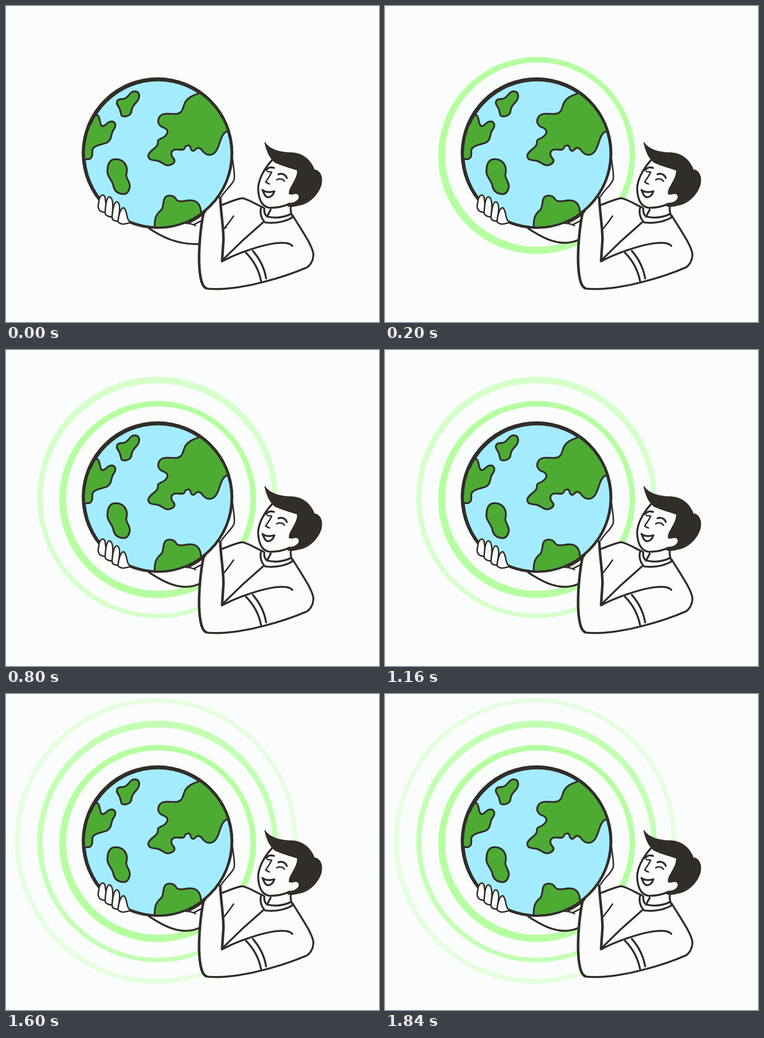
An HTML page that plays this animation: 813 px wide and 689 px high, repeating every 2 s.

```html
<!DOCTYPE html>
<html lang="en">
<head>
<meta charset="utf-8">
<title>Holding the globe</title>
<style>
  html, body { margin: 0; width: 100%; height: 100%; overflow: hidden; background: #fbfdfc; }
  svg { display: block; width: 100%; height: 100%; }
  .ink { fill: none; stroke: #312d29; stroke-width: 4.2; stroke-linecap: round; stroke-linejoin: round; }
  .skin { fill: #fbfdfc; }
  .dark { fill: #312d29; }
  .land { fill: #4dab34; stroke: #312d29; stroke-width: 3.9; stroke-linejoin: round; }
  .thin { stroke-width: 3.2; }
  .thick { stroke-width: 5.6; }
</style>
</head>
<body>
<svg viewBox="0 0 813 689">
  <defs>
    <clipPath id="sea"><circle cx="331" cy="322" r="159"/></clipPath>
  </defs>

  <g id="rings"></g>

  <!-- far arm -->
  <path class="skin" d="M312 485C335 503 370 520 400 517L424 510 470 435 400 440Z"/>
  <path id="forearm" class="ink"/>
  <path class="ink thin" d="M392 474C400 474 408 476 413 479M409 477L428 467"/>

  <!-- torso and near arm -->
  <path class="skin" d="M470 434C486 428 502 421 515 419C530 422 546 433 560 439L622 437 626 457C645 490 668 520 670 540C670 554 668 562 656 570C630 581 600 592 560 602C520 613 470 620 436 615C428 612 422 590 421 560C420 530 424 480 432 448L467 416Z"/>
  <path class="skin" d="M494 333C495 350 500 368 497 380C490 395 478 401 469 417L432 450 470 380Z"/>
  <path class="ink thin" d="M494 334C495 350 500 368 497 379C491 393 480 399 470 415"/>

  <!-- globe -->
  <circle class="dark" cx="330.3" cy="320.8" r="165.3"/>
  <circle cx="331.3" cy="322.3" r="158" fill="#a3ecff"/>
  <g class="land" clip-path="url(#sea)">
    <path d="M422 190C410 194 396 199 390 211C385 222 386 232 373 235C360 237 345 231 336 240C328 250 332 260 341 264C352 268 355 274 349 281C342 291 330 288 331 297C333 309 312 314 310 326C310 337 322 336 328 337C339 338 344 349 356 347C368 344 370 337 364 331C357 323 361 314 369 313C378 312 386 316 389 311C391 304 399 301 402 308C403 315 407 318 412 314C416 308 422 308 427 314C433 323 443 328 452 322C467 312 465 282 480 274L505 270 480 180Z"/>
    <path d="M198 238C206 238 203 262 211 262C220 260 222 250 233 252C242 256 238 266 233 272C228 282 231 294 217 299C200 304 187 306 188 318C189 328 186 335 176 334L150 330 160 240Z"/>
    <path d="M269 193C274 186 282 184 287 188C293 194 290 204 284 210C277 217 274 222 273 232C270 240 258 243 252 239C249 232 250 226 245 219C239 211 241 204 250 203C260 203 263 200 269 193Z"/>
    <path d="M228 338C233 332 249 333 256 340C264 348 265 358 262 368C262 376 269 382 270 392C269 404 263 411 255 410C243 409 236 402 234 392C233 382 222 374 221 362C221 350 223 342 228 338Z"/>
    <path d="M325 490C322 466 326 455 338 445C345 438 341 425 347 417C354 411 366 413 370 420C374 428 384 426 396 424C412 422 424 428 425 450L430 500Z"/>
  </g>
  <path class="ink thick" d="M184 257Q190 242 200 229M400 471Q420 462 434 448"/>

  <!-- fingers -->
  <g class="ink thin">
    <path class="skin" d="M203 423C206 410 214 409 216 418C218 430 219 442 216 450C205 449 200 444 201 434Z"/>
    <path class="skin" d="M216 451C217 432 219 416 226 416C234 418 234 440 231 460C224 460 217 457 216 451Z"/>
    <path class="skin" d="M231 460C233 440 236 427 242 427C250 430 248 450 244 469C236 469 231 466 231 460Z"/>
    <path class="skin" d="M244 470C246 452 251 439 257 440C264 446 262 459 267 467L271 472C259 476 250 478 244 470Z"/>
  </g>

  <!-- near arm and clothes -->
  <path class="ink thick" d="M431 450C424 480 420 530 421 560C422 590 427 612 436 615"/>
  <path class="ink" d="M436 616C470 620 520 613 560 602C600 592 635 579 656 570C667 562 670 552 670 540C666 519 645 490 625 457"/>
  <path class="ink thick" d="M467 418C468 450 474 480 474 510L471 555"/>
  <path class="ink" d="M470 434C486 428 502 421 515 419C530 422 546 433 560 439M560 472L515 512 472 554"/>
  <path class="ink" d="M471 557C500 540 560 520 590 517C610 515 620 518 624 523"/>
  <path class="ink" d="M523 538C540 555 551 575 556 600M538 534C552 550 563 570 567 594"/>
  <path class="ink thin" d="M496 458Q486 473 475 486"/>
  <path id="crease" class="ink thin" d="M474 485L480 483"/>

  <!-- head -->
  <path class="skin" d="M579 337C560 358 547 385 550 405C552 425 560 438 575 440C595 440 610 436 618 431L640 425 640 350Z"/>
  <path class="ink" d="M579 337C560 358 547 385 550 405C552 425 560 438 575 440C595 440 608 436 618 431"/>
  <path class="ink" d="M556 440C553 450 556 464 565 472C590 475 612 469 626 460M563 441C562 450 565 456 569 459L577 444M569 459C590 464 608 460 622 453M621 435Q619 448 624 458"/>
  <path class="dark" stroke="#312d29" stroke-width="1.5" d="M564 297C574 314 600 320 625 320C648 322 664 336 672 357C685 358 691 374 687 390C680 412 660 432 636 435C628 437 620 439 614 436L618 430C632 430 643 420 637 411C630 405 625 414 617 409L618 402C622 390 637 373 635 358C618 352 600 348 585 340C572 328 567 312 564 297Z"/>
  <path class="ink" d="M567 358Q573 349 584 353M594 367C601 364 609 367 612 375"/>
  <path class="ink thin" d="M570 361L579 362C576 370 570 377 566 384L574 388M590 379C596 375 603 377 607 382"/>
  <path class="ink" d="M559 401C564 406 575 407 585 404C582 414 574 419 568 416C563 413 562 407 559 401Z"/>
</svg>

<script>
const LOOP = 2000;

// Each ring is an outer ellipse with an off-centre ellipse cut out: [cx, cy, rx, ry].
// Steps give the time and colour of each change.
const rings = [
  { outer: [330.5, 326, 214.5, 215], inner: [332, 324, 201, 201], steps: [[200, '#b5ffa1']] },
  { outer: [330, 321.5, 262, 263.5], inner: [330, 324, 250.5, 251], steps: [[800, '#d6ffcc'], [1400, '#c4ffb5']] },
  { outer: [327, 320.5, 308, 311.5], inner: [327.5, 320, 297.5, 301], steps: [[1400, '#e4ffde']] }
];

const ellipse = ([cx, cy, rx, ry]) =>
  `M${cx - rx} ${cy}a${rx} ${ry} 0 1 0 ${2 * rx} 0a${rx} ${ry} 0 1 0 ${-2 * rx} 0Z`;

for (const ring of rings) {
  ring.path = document.createElementNS('http://www.w3.org/2000/svg', 'path');
  ring.path.setAttribute('d', ellipse(ring.outer) + ellipse(ring.inner));
  ring.path.setAttribute('fill-rule', 'evenodd');
  document.getElementById('rings').append(ring.path);
}

const forearm = document.getElementById('forearm');
const crease = document.getElementById('crease');

function draw(now) {
  const t = now % LOOP;
  for (const { path, steps } of rings) {
    const step = steps.filter(([start]) => t >= start).pop();
    path.setAttribute('fill', step ? step[1] : 'none');
  }
  const resting = t < 200;
  forearm.setAttribute('d', 'M312 485C335 500 ' +
    (resting ? '370 521 420 519' : '366 519 398 516Q412 515 423 509'));
  crease.setAttribute('visibility', resting ? 'visible' : 'hidden');
}

const start = performance.now();
function tick() {
  draw(performance.now() - start);
  requestAnimationFrame(tick);
}
tick();
</script>
</body>
</html>
```
